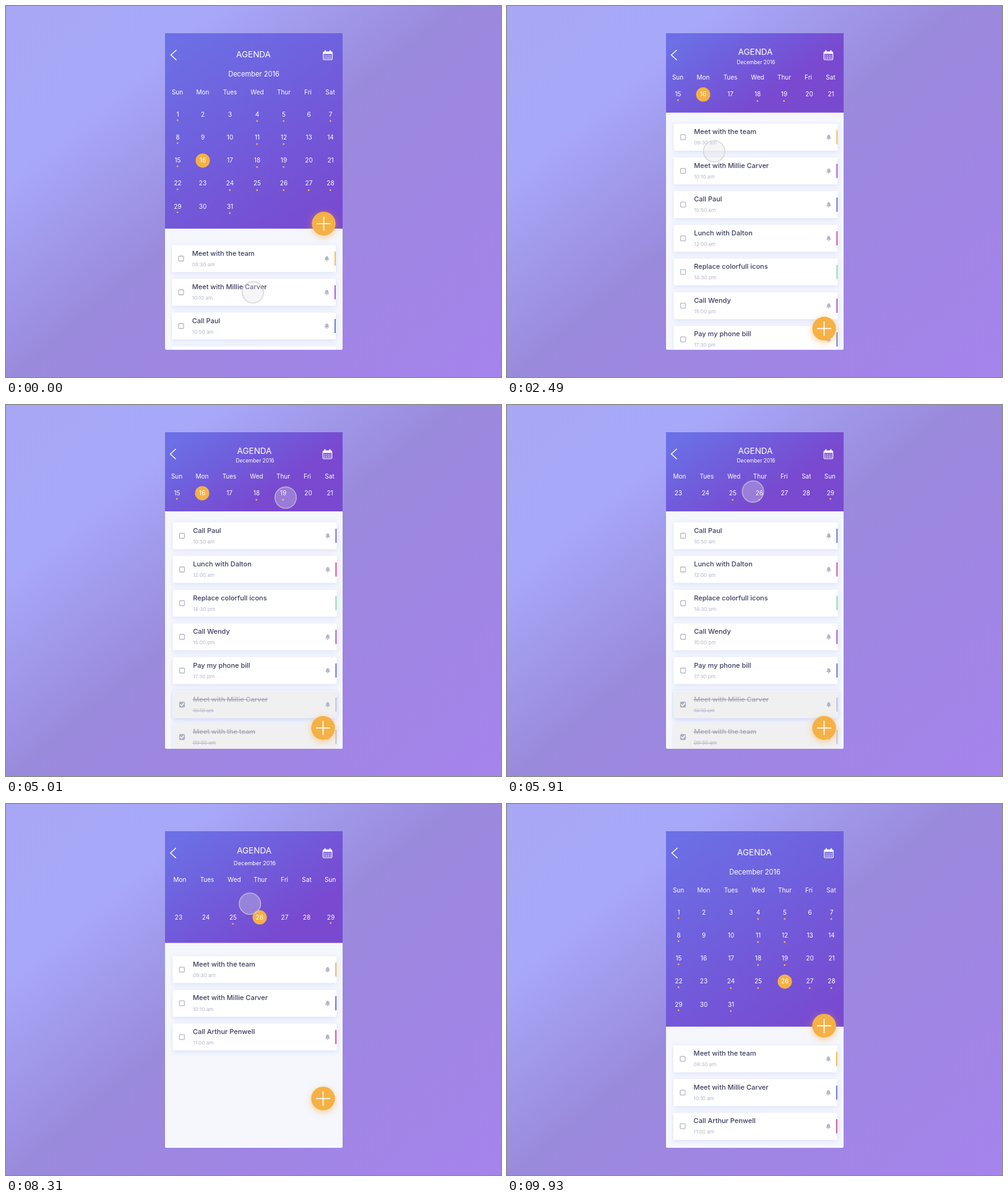
An HTML page with a canvas for the animation above (9.96 s loop, 800 by 600 pixels).

```html
<!DOCTYPE html>
<html lang="en">
<head>
<meta charset="utf-8">
<title>Calendar tasks</title>
<style>
html, body { margin: 0; width: 100%; height: 100%; overflow: hidden; }
canvas { display: block; }
</style>
</head>
<body>
<canvas id="stage" width="800" height="600"></canvas>
<script>
const ctx = document.getElementById('stage').getContext('2d');
const LOOP = 9960, LEFT = 257, TOP = 44, WIDTH = 287, HEIGHT = 512, STEP = 54.5;
const ORANGE = '#f5b146', INK = '#3a3e60', MUTED = '#b3b7c8';
const DAYS = ['Sun', 'Mon', 'Tues', 'Wed', 'Thur', 'Fri', 'Sat'];
const LABEL_X = [277, 318, 362, 406, 449, 488, 524];
const DATE_X = [277.5, 318, 362, 406, 449, 489.5, 524.5];
const NEXT_LABEL_X = [281, 325, 369, 411, 450, 486, 524];
const NEXT_DATE_X = [279, 323, 367, 410, 450.5, 486, 525];
const BUSY = new Set([1, 4, 5, 7, 8, 11, 12, 15, 18, 19, 22, 24, 25, 26, 27, 28, 29, 31]);
const WEEK_SHIFT = 322;

const task = (title, time, color, bell = true) => ({ title, time, color, bell });
const monday = [
  task('Meet with the team', '09:30 am', '#f3b04a'),
  task('Meet with Millie Carver', '10:10 am', '#a642cf'),
  task('Call Paul', '10:50 am', '#5c62c6'),
  task('Lunch with Dalton', '12:00 am', '#d03f7c'),
  task('Replace colorfull icons', '14:30 pm', '#7fdca0', false),
  task('Call Wendy', '15:00 pm', '#9b45d0'),
  task('Pay my phone bill', '17:30 pm', '#5c62c6'),
  task('Go shopping', '20:30 pm', '#7fdca0', false)
];
const thursday = [
  task('Meet with the team', '09:30 am', '#f0b13f'),
  task('Meet with Millie Carver', '10:10 am', '#5362cf'),
  task('Call Arthur Penwell', '11:00 am', '#d63c78')
];

const lerp = (a, b, p) => a + (b - a) * p;
const clamp = v => Math.max(0, Math.min(1, v));
const ease = p => p < .5 ? 4 * p ** 3 : 1 - 4 * (1 - p) ** 3;

// Eased value at time t from [time, value] keys.
function track(t, ...keys) {
  if (t <= keys[0][0]) return keys[0][1];
  for (let i = 1; i < keys.length; i++) {
    const [t0, v0] = keys[i - 1], [t1, v1] = keys[i];
    if (t < t1) return lerp(v0, v1, ease((t - t0) / (t1 - t0)));
  }
  return keys[keys.length - 1][1];
}

function spring(t, start) {
  const u = Math.max(0, t - start) / 1000;
  return 1 - Math.exp(-5 * u) * Math.cos(5 * u);
}

function text(str, x, y, size, color, align = 'center', weight = 400) {
  ctx.font = `${weight} ${size}px Inter, sans-serif`;
  ctx.textAlign = align;
  ctx.textBaseline = 'middle';
  ctx.fillStyle = color;
  ctx.fillText(str, x, y);
}

function circle(x, y, r, color) {
  ctx.beginPath();
  ctx.arc(x, y, r, 0, 7);
  ctx.fillStyle = color;
  ctx.fill();
}

function box(x, y, w, h, r, color) {
  ctx.beginPath();
  ctx.roundRect(x, y, w, h, r);
  ctx.fillStyle = color;
  ctx.fill();
}

// Rounded outline centred on the given rectangle.
function outline(x, y, w, h, r, width, color) {
  const half = width / 2;
  ctx.beginPath();
  for (const d of [half, -half]) ctx.roundRect(x - d, y - d, w + 2 * d, h + 2 * d, Math.max(0, r + d));
  ctx.fillStyle = color;
  ctx.fill('evenodd');
}

function line(color, width, ...points) {
  const half = width / 2;
  ctx.beginPath();
  for (let i = 1; i < points.length; i++) {
    const [x0, y0] = points[i - 1], [x1, y1] = points[i];
    const len = Math.hypot(x1 - x0, y1 - y0) || 1;
    const ux = (x1 - x0) / len * half, uy = (y1 - y0) / len * half;
    ctx.moveTo(x0 - ux - uy, y0 - uy + ux);
    ctx.lineTo(x1 + ux - uy, y1 + uy + ux);
    ctx.lineTo(x1 + ux + uy, y1 + uy - ux);
    ctx.lineTo(x0 - ux + uy, y0 - uy - ux);
    ctx.closePath();
  }
  ctx.fillStyle = color;
  ctx.fill();
}

function gradient(x0, y0, x1, y1, ...stops) {
  const g = ctx.createLinearGradient(x0, y0, x1, y1);
  stops.forEach(([at, color]) => g.addColorStop(at, color));
  return g;
}

function shadow(color, blur, y) {
  ctx.shadowColor = color;
  ctx.shadowBlur = blur;
  ctx.shadowOffsetY = y;
}

// Draws inside a clipped rectangle with its own state.
function clipped(x, y, w, h, r, draw) {
  ctx.save();
  ctx.beginPath();
  ctx.roundRect(x, y, w, h, r);
  ctx.clip();
  draw();
  ctx.restore();
}

function faded(alpha, draw) {
  if (alpha <= 0) return;
  ctx.save();
  ctx.globalAlpha *= alpha;
  draw();
  ctx.restore();
}

function bell(x, y) {
  ctx.beginPath();
  ctx.moveTo(x - 4, y + 2.6);
  ctx.quadraticCurveTo(x - 2.6, y + 1.5, x - 2.6, y - 1);
  ctx.bezierCurveTo(x - 2.4, y - 5, x + 2.4, y - 5, x + 2.6, y - 1);
  ctx.quadraticCurveTo(x + 2.6, y + 1.5, x + 4, y + 2.6);
  ctx.fillStyle = MUTED;
  ctx.fill();
  box(x - 1.2, y + 3, 2.4, 1.4, .7, MUTED);
}

function checkbox(x, y, done) {
  outline(x - 4, y - 4, 8, 8, 1.2, 1.3, '#b5b8c6');
  faded(done, () => {
    box(x - 4.5, y - 4.5, 9, 9, 1.5, '#adb0be');
    line('#fff', 1.4, [x - 2.5, y], [x - .6, y + 2], [x + 2.7, y - 2]);
  });
}

function card(item, dx, y, done = 0, boxY = y) {
  const x = 268 + dx;
  ctx.save();
  shadow('rgba(110,125,235,.2)', 8, 2);
  box(x, y - 21.7, 265, 43.4, 2, '#fff');
  ctx.restore();
  faded(done, () => box(x, y - 21.7, 265, 43.4, 2, '#f0f0f1'));
  faded(1 - .62 * done, () => {
    text(item.title, x + 32.7, y - 8.3, 11, INK, 'left', 500);
    if (done) line(INK, .9, [x + 32, y - 8], [x + 32 + ctx.measureText(item.title).width * done, y - 8]);
  });
  text(item.time, x + 32.7, y + 9.7, 8.2, MUTED, 'left');
  if (done) line(MUTED, .8, [x + 32, y + 10], [x + 32 + ctx.measureText(item.time).width * done, y + 10]);
  if (item.bell) bell(x + 250.5, y);
  box(x + 263, y - 11.5, 1.7, 23, .5, done > .5 ? '#b9bbd0' : item.color);
  checkbox(x + 15, boxY, done);
}

function drawLists(t, fold, lift) {
  const slide = spring(t, 6600) * 288;
  const drag = track(t, [1650, 0], [1950, -8.8], [2350, 0]);
  if (slide < 288 && t < 7100) {
    const first = lerp(408.5, 211.5, fold) + drag + lift;
    const dx = 1.5 * fold - slide;
    const moved = [track(t, [3180, 0], [3790, 1]), track(t, [4250, 0], [4860, 1])];
    const done = [track(t, [2930, 0], [3130, 1]), track(t, [4000, 0], [4200, 1])];
    for (let i = 7; i >= 2; i--) card(monday[i], dx, first + (i - moved[0] - moved[1]) * STEP);
    const secondTop = first + (1 - moved[0]) * STEP;
    card(monday[1], dx, lerp(secondTop, 484.5, moved[1]), done[1],
      lerp(secondTop, 484.5, clamp(moved[1] * 1.08)));
    card(monday[0], dx, lerp(first, 537, moved[0]), done[0],
      lerp(first, 537, clamp(moved[0] * 1.08)));
  }
  if (t > 6600) {
    const first = lerp(412.2, 211.5, fold) + lift;
    thursday.forEach((item, i) => card(item, lerp(.9, 1.5, fold) + 288 - slide, first + i * STEP));
  }
}

function date(n, x, y, busy, sunday, selected) {
  if (selected) circle(x, y - .3, 11.5 * selected, ORANGE);
  text(n, x, y, 10, '#fff');
  if (busy && !selected) circle(x - .3, y + (sunday ? 9 : 10.3), 1.4, ORANGE);
}

function drawMonth(picked, fold, labelY) {
  DAYS.forEach((d, i) => text(d, LABEL_X[i] - fold, labelY, 10, '#fff'));
  for (let n = 1; n <= 31; n++) {
    const col = (n - 1) % 7, row = Math.floor((n - 1) / 7);
    date(n, DATE_X[col] - fold, lerp(175.7 + row * 37.25, 143, fold), BUSY.has(n), !col, n === picked);
  }
}

function drawWeeks(t, fold, labelY) {
  const scroll = track(t, [5280, 0], [5840, 324.2], [6250, WEEK_SHIFT]);
  const y = lerp(t < 6000 ? 250.2 : 287.5, 143, fold);
  for (let i = 0; i < 8; i++) {
    const x = i < 7 ? LABEL_X[i] - fold : 562, dx = i < 7 ? DATE_X[i] - fold : 562;
    text(DAYS[i % 7], x - scroll, labelY, 10, '#fff');
    date(15 + i, dx - scroll, y, BUSY.has(15 + i), i % 7 === 0, i === 1);
  }
  const picked = track(t, [6330, 0], [6560, 1]);
  for (let i = 0; i < 7; i++) {
    const n = 23 + i, shift = WEEK_SHIFT - scroll;
    text(DAYS[(i + 1) % 7], NEXT_LABEL_X[i] + shift, labelY, 10, '#fff');
    date(n, NEXT_DATE_X[i] + shift, y, [25, 26, 29].includes(n), n === 29, n === 26 && picked);
  }
}

function calendarIcon(x, y) {
  outline(x - 7.2, y - 5.5, 14.4, 13, 1.5, 1.2, '#fff');
  box(x - 7.2, y - 5.5, 14.4, 3.6, 1, '#fff');
  for (const dx of [-4, 4]) box(x + dx - 1, y - 8, 2, 3.5, .8, '#fff');
  for (let i = 0; i < 12; i++) box(x - 5.2 + i % 4 * 2.9, y + Math.floor(i / 4) * 2.4, 1.7, 1.3, 0, '#fff');
}

function drawHeader(t, fold, lift) {
  const bottom = lerp(360.3, 172, fold) + lift, h = bottom - TOP;
  clipped(LEFT, TOP, WIDTH, h, 0, () => {
    ctx.fillStyle = gradient(LEFT + 40, TOP, LEFT + 40 + h * .7, bottom,
      [0, '#6c6fe5'], [.45, '#705edc'], [1, '#7949d0']);
    ctx.fillRect(LEFT, TOP, WIDTH, h);
    ctx.translate(0, lift);
    const ax = 270.5 - fold;
    line('#fff', 1.4, [ax + 4.5, 71.5], [ax - 4, 79.3], [ax + 4.5, 87]);
    calendarIcon(520 - .6 * fold, 79.5);
    text('AGENDA', 400 + 1.5 * fold, lerp(79, 75.3, fold), 13.5, '#fff');
    text('December 2016', 400.5 + 2 * fold, lerp(110.7, 91, fold), lerp(11.1, 8.3, fold), '#fff');
    const labelY = lerp(139.8, 116, fold), weekly = clamp(2 * fold);
    faded(1 - weekly, () => drawMonth(t < 6330 ? 16 : 26, fold, labelY));
    faded(weekly, () => drawWeeks(t, fold, labelY));
  });
}

function drawAddButton(t, fold, lift) {
  const late = t > 6330;
  const x = late ? 512.5 : 513.5 - fold, y = lerp(late ? 358.6 : 352, 522.3, fold) - .8 * lift;
  ctx.save();
  shadow('rgba(245,170,60,.55)', 12, 3);
  circle(x, y, 19.2, ORANGE);
  ctx.restore();
  line('#fff', 1.7, [x - 10.7, y], [x + 10.7, y]);
  line('#fff', 1.7, [x, y - 10.7], [x, y + 10.7]);
}

const touchPath = [
  [400, 399, 463], [1600, 372, 412], [1950, 368, 403], [2450, 335, 235], [2850, 285.5, 211.5],
  [4500, 285.5, 211.5], [5220, 470, 143], [5650, 340, 138], [5910, 397.5, 140], [6250, 406.5, 145],
  [7500, 406.5, 145], [8050, 396, 140], [8760, 387, 247]
];

function drawTouch(t) {
  const x = track(t, ...touchPath.map(k => [k[0], k[1]]));
  const y = track(t, ...touchPath.map(k => [k[0], k[2]]));
  faded(track(t, [8850, 1], [9150, 0]), () => {
    circle(x, y, 17.3, 'rgba(226,226,230,.32)');
    outline(x - 17.3, y - 17.3, 34.6, 34.6, 17.3, 1.5, 'rgba(204,204,209,.75)');
  });
}

function draw() {
  const t = performance.now() % LOOP;
  const fold = track(t, [1930, 0], [2550, 1], [8080, 1], [8640, 0]);
  const lift = track(t, [8300, 0], [8650, -3.4], [9050, 0]);
  ctx.fillStyle = gradient(0, 0, 623, 750,
    [0, '#a7a7f5'], [.22, '#a8a8f9'], [.48, '#9a8adc'], [.72, '#a085e4'], [1, '#a584ec']);
  ctx.fillRect(0, 0, 800, 600);
  clipped(LEFT, TOP, WIDTH, HEIGHT, [0, 0, 2, 2], () => {
    ctx.fillStyle = '#f5f7fd';
    ctx.fillRect(LEFT, TOP, WIDTH, HEIGHT);
    clipped(266, TOP, 278, HEIGHT, 0, () => drawLists(t, fold, lift));
    drawHeader(t, fold, lift);
    drawAddButton(t, fold, lift);
  });
  drawTouch(t);
  requestAnimationFrame(draw);
}
draw();
</script>
</body>
</html>
```
